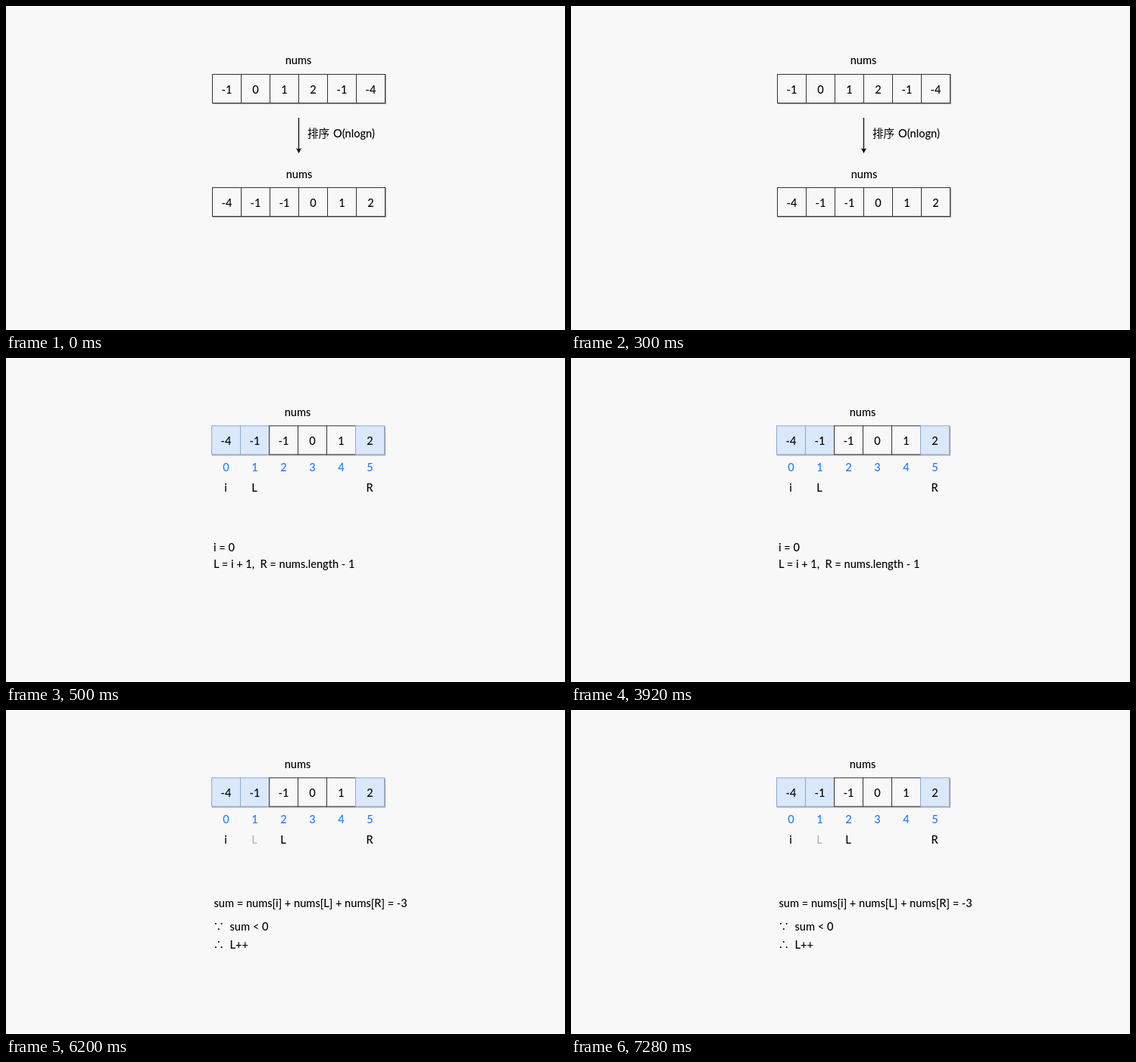
Animation of 738x429 px, one loop 8000 ms. Source, as an HTML page:

```html
<!DOCTYPE html>
<html lang="zh">
<head>
<meta charset="utf-8">
<style>
  html, body { margin: 0; width: 100%; height: 100%; overflow: hidden; background: #f8f8f8; }
  svg { display: block; width: 738px; height: 429px; }
  text { font: 500 14.6px Lato, "Noto Sans CJK SC", "Noto Sans CJK", sans-serif; white-space: pre; }
  .mid { text-anchor: middle; }
  .cjk { font-weight: 400; font-family: "Noto Sans CJK SC", "Noto Sans CJK", "DejaVu Sans", sans-serif; }
</style>
</head>
<body>
<svg id="stage" viewBox="0 0 738 429"></svg>
<script>
const LOOP = 8000, POINTERS_AT = 500, SUM_AT = 6200;
const CELL = 38, BLUE = '#1a7fff', INK = '#000';
const sorted = [-4, -1, -1, 0, 1, 2];

const label = (x, y, str, cls = '', color = INK) =>
  `<text x="${x}" y="${y}" class="${cls}" fill="${color}">${str}</text>`;

function cells(x, y, values, marked = []) {
  const shadow = `<rect x="${x + 1}" y="${y + 1}" width="${CELL * values.length}" height="${CELL}" fill="none" stroke="#888" stroke-opacity=".7" stroke-width="1.2"/>`;
  return shadow + values.map((value, k) => {
    const on = marked.includes(k), left = x + k * CELL;
    return `<rect x="${left}" y="${y}" width="${CELL}" height="${CELL}" fill="${on ? '#dae8fc' : '#f8f8f8'}" stroke="${on ? '#8ba8d0' : '#333'}"/>`
      + label(left + CELL / 2, y + 25, value, 'mid');
  }).join('');
}

const center = k => 290.5 + k * CELL;
const pointer = (k, name, color) => label(center(k) - 0.5, 177, name, 'mid', color);

const sorting =
  label(386, 77, 'nums', 'mid') + cells(272.5, 90.5, [-1, 0, 1, 2, -1, -4]) +
  `<path d="M386.5 148V190" stroke="#000" stroke-width="1.2"/><path d="M386.5 195L383 188L386.5 189.7L390 188Z"/>` +
  label(398, 174, '排序', 'cjk') + label(432, 174, 'O(nlogn)') +
  label(387, 228, 'nums', 'mid') + cells(272.5, 240.5, sorted);

const array =
  label(385, 77, 'nums', 'mid') + cells(271.5, 89.8, sorted, [0, 1, 5]) +
  sorted.map((_, k) => label(center(k), 150, k, 'mid', BLUE)).join('') +
  pointer(0, 'i') + pointer(5, 'R');

const pointers = array + pointer(1, 'L') +
  label(274, 255.5, 'i = 0') +
  label(274, 278, 'L = i + 1,  R = nums.length - 1');

const sum = array + pointer(1, 'L', '#b3b3b3') + pointer(2, 'L') +
  label(274.5, 260.5, 'sum = nums[i] + nums[L] + nums[R] = -3') +
  label(273.5, 291.5, '∵', 'cjk') + label(295.5, 291.5, 'sum &lt; 0') +
  label(273.5, 315.5, '∴', 'cjk') + label(295.5, 315.5, 'L++');

const stage = document.getElementById('stage');
let shown;
function draw() {
  const t = performance.now() % LOOP;
  const scene = t < POINTERS_AT ? sorting : t < SUM_AT ? pointers : sum;
  if (scene !== shown) stage.innerHTML = shown = scene;
  requestAnimationFrame(draw);
}
draw();
</script>
</body>
</html>
```
